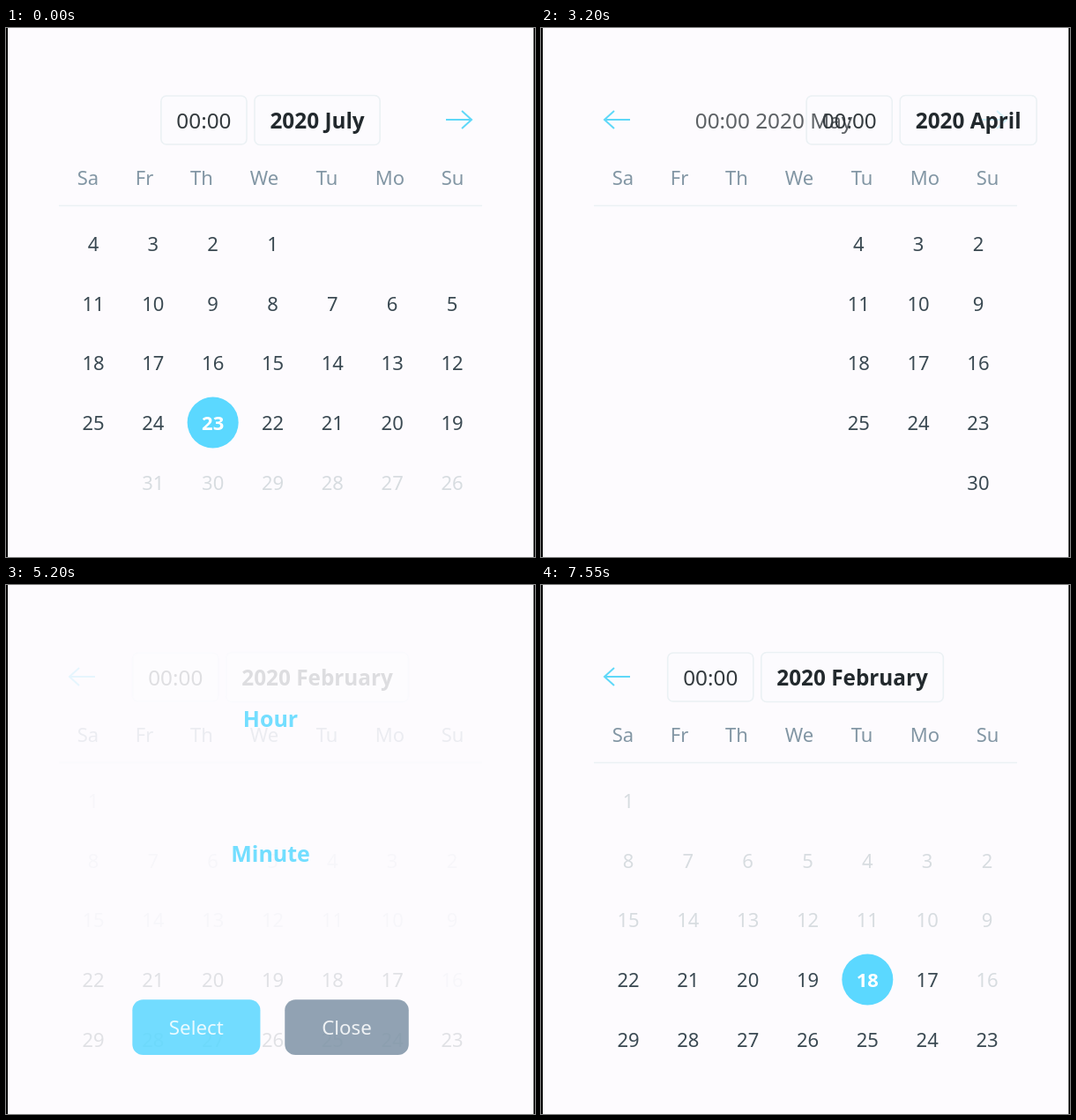
Write an HTML page with a canvas that moves like this. It is 600 by 600 pixels and loops after 8350 ms.

```html
<!DOCTYPE html>
<html lang="en">
<head>
<meta charset="utf-8">
<title>Date picker</title>
<style>
html, body { margin: 0; width: 100%; height: 100%; overflow: hidden; background: #fdfbfe; }
canvas { display: block; width: 600px; height: 600px; }
</style>
</head>
<body>
<canvas id="stage" width="600" height="600"></canvas>
<script>
const ctx = document.getElementById('stage').getContext('2d');
const LOOP = 8350;
const BG = '#fdfbfe', CYAN = '#5bd8ff', SLATE = '#7f94a6', INK = '#3a4952',
      DARK = '#22292d', DIM = '#d7dce0', RULE = '#ebf1f4';
const SANS = '"Noto Sans", "Open Sans", sans-serif';
const MONTHS = ['January', 'February', 'March', 'April', 'May', 'June', 'July',
  'August', 'September', 'October', 'November', 'December'];
const FIRST = 1, LAST = 6; // selectable months, February to July
const TITLE = 24.3, PAD = 17.5, GAP = 9;

const clamp = v => Math.min(1, Math.max(0, v));
const span = (t, start, length) => clamp((t - start) / length);
const easeOut = u => 1 - (1 - u) ** 3;

// cubic-bezier(.25, .1, .25, 1)
function ease(x) {
  const bez = (u, a, b) => 3 * u * (1 - u) ** 2 * a + 3 * u * u * (1 - u) * b + u ** 3;
  let lo = 0, hi = 1;
  for (let i = 0; i < 20; i++) {
    const mid = (lo + hi) / 2;
    if (bez(mid, .25, .25) < x) lo = mid; else hi = mid;
  }
  return bez(lo, .1, 1);
}

const font = (size, weight = 400, family = SANS) => `${weight} ${size}px ${family}`;

function text(str, x, y, color, face = font(22), align = 'center') {
  ctx.font = face;
  ctx.textAlign = align;
  ctx.fillStyle = color;
  ctx.fillText(str, x, y);
}

function width(str, face) {
  ctx.font = face;
  return ctx.measureText(str).width;
}

function box(x, y, w, h, r, fill, stroke) {
  ctx.beginPath();
  ctx.roundRect(x, y, w, h, r);
  ctx.fillStyle = fill;
  ctx.fill();
  if (stroke) {
    ctx.strokeStyle = stroke;
    ctx.lineWidth = 1.6;
    ctx.stroke();
  }
}

function layer(alpha, scale, draw) {
  if (alpha <= 0) return;
  ctx.save();
  ctx.globalAlpha *= alpha;
  ctx.translate(300, 320);
  ctx.scale(scale, scale);
  ctx.translate(-300, -320);
  draw();
  ctx.restore();
}

function arrow(tip, dir) {
  ctx.beginPath();
  ctx.moveTo(tip - dir * 29, 104);
  ctx.lineTo(tip, 104);
  ctx.moveTo(tip - dir * 11, 94);
  ctx.lineTo(tip, 104);
  ctx.lineTo(tip - dir * 11, 114);
  ctx.strokeStyle = '#5fd8f8';
  ctx.lineWidth = 2;
  ctx.stroke();
}

function header(month, shift, hover) {
  const label = '2020 ' + MONTHS[month], bold = font(TITLE, 700);
  const timeW = width('00:00', font(TITLE)) + 2 * PAD;
  const labelW = width(label, bold) + 2 * PAD;
  const total = timeW + GAP + labelW;
  const x = 300 - total / 2 + shift * total;
  const fill = 'rgba(253,251,254,.75)';
  box(x, 77, timeW, 55, 6, fill, RULE);
  box(x + timeW + GAP, 76.5, labelW, 56, 6, fill, RULE);
  text('00:00', x + PAD, 114, '#333a3e', font(TITLE), 'left');
  layer(hover ? .85 : 1, 1, () =>
    text(label, x + timeW + GAP + PAD, 114, DARK, bold, 'left'));
}

function days(month, shift, picked, pick) {
  const lead = new Date(2020, month, 1).getDay();
  const count = new Date(2020, month + 1, 0).getDate();
  ctx.save();
  ctx.beginPath();
  ctx.rect(60, 205, 482, 395);
  ctx.clip();
  for (let d = 1; d <= count; d++) {
    const cell = lead + d - 1;
    const x = 99 + 67.83 * (6 - cell % 7) + shift * 518;
    const y = 245 + 67.75 * Math.floor(cell / 7);
    const off = (month === LAST && d > 25) || (month === FIRST && d < 17);
    const on = d === picked ? pick : 0;
    layer(1 - on, 1, () => text(d, x, y + 7.8, off ? DIM : INK));
    layer(on, 1, () => {
      ctx.beginPath();
      ctx.arc(x, y - .8, 29, 0, 7);
      ctx.fillStyle = CYAN;
      ctx.fill();
      text(d, x, y + 7.8, '#fff', font(22, 700));
    });
  }
  ctx.restore();
}

const SLIDES = [ // start, length, month shown from then on
  [3150, 250, 3], [3550, 300, 2], [4000, 250, 1]
];

function calendar(t) {
  let month = t < 2450 ? 6 : 4, before = month, u = 1;
  for (const [start, length, next] of SLIDES) {
    if (t < start) break;
    before = month;
    month = next;
    u = span(t, start, length);
  }
  const shift = 1 - easeOut(u);
  if (month < LAST) arrow(72, -1);
  if (month > FIRST) arrow(528, 1);
  header(month, shift, t >= 650 && t < 1250);
  layer(1 - u, 1, () =>
    text('00:00 2020 ' + MONTHS[before], 176 + 88, 114, '#333a3e', font(TITLE)));

  ['Sa', 'Fr', 'Th', 'We', 'Tu', 'Mo', 'Su'].forEach((name, i) =>
    text(name, [93, 157, 222, 293, 364, 435.5, 506.5][i], 178, '#8296a4'));
  ctx.fillStyle = RULE;
  ctx.fillRect(60, 200.7, 480, 1.6);

  if (month === LAST) days(month, 0, 23, 1);
  else days(month, shift, month === FIRST ? 18 : 0, ease(span(t, 6950, 350)));
}

function monthPicker(t) {
  text('2020', 300.5, 148.5, DARK, font(24, 700, 'Roboto, sans-serif'));
  MONTHS.forEach((name, i) => {
    const x = 449.3 - 147.4 * (i % 3), y = 267.5 + 78.4 * Math.floor(i / 3);
    const color = i < FIRST || i > LAST ? DIM : INK;
    layer(i === 4 && t >= 2250 ? .85 : 1, 1, () => text(name, x, y, color, font(21.7)));
  });
}

function timePicker(t) {
  const bold = font(24.6, 700);
  text('Hour', 300, 163, CYAN, bold);
  text('Minute', 300, 314, CYAN, bold);
  layer(ease(span(t, 5220, 530)), 1, () => {
    [['00', '01', '02'], ['00', '30']].forEach((row, r) => row.forEach((value, i) => {
      const size = [28.3, 21.3, 19.6][i];
      text(value, 300 + 106.8 * i, (r ? 373 : 222) + size * .357,
        ['#4a565e', '#8c969c', '#c3cace'][i], font(size));
    }));
  });
  box(145.6, 468, 143, 62, 12, CYAN);
  text('Select', 217, 507, '#fff');
  layer(t >= 6200 ? .9 : 1, 1, () => {
    box(316, 468, 138.5, 62, 12, SLATE);
    text('Close', 385.3, 507, '#fff');
  });
}

function draw(t) {
  ctx.fillStyle = BG;
  ctx.fillRect(0, 0, 600, 600);

  // 0 = hidden, 1 = fully open
  const months = ease(span(t, 800, 420)) - ease(span(t, 2450, 250));
  const clock = ease(span(t, 4900, 540)) - ease(span(t, 6450, 300));

  layer(1 - months - clock, 1, () => calendar(t));
  layer(months, 1.1 - .1 * months, () => monthPicker(t));
  layer(clock, 1.1 - .1 * clock, () => timePicker(t));

  ctx.fillStyle = '#000';
  ctx.fillRect(0, 0, 2, 600);
  ctx.fillRect(598.4, 0, 1.6, 600);
}

const begin = performance.now();
function tick() {
  draw((performance.now() - begin) % LOOP);
  requestAnimationFrame(tick);
}
tick();
</script>
</body>
</html>
```
